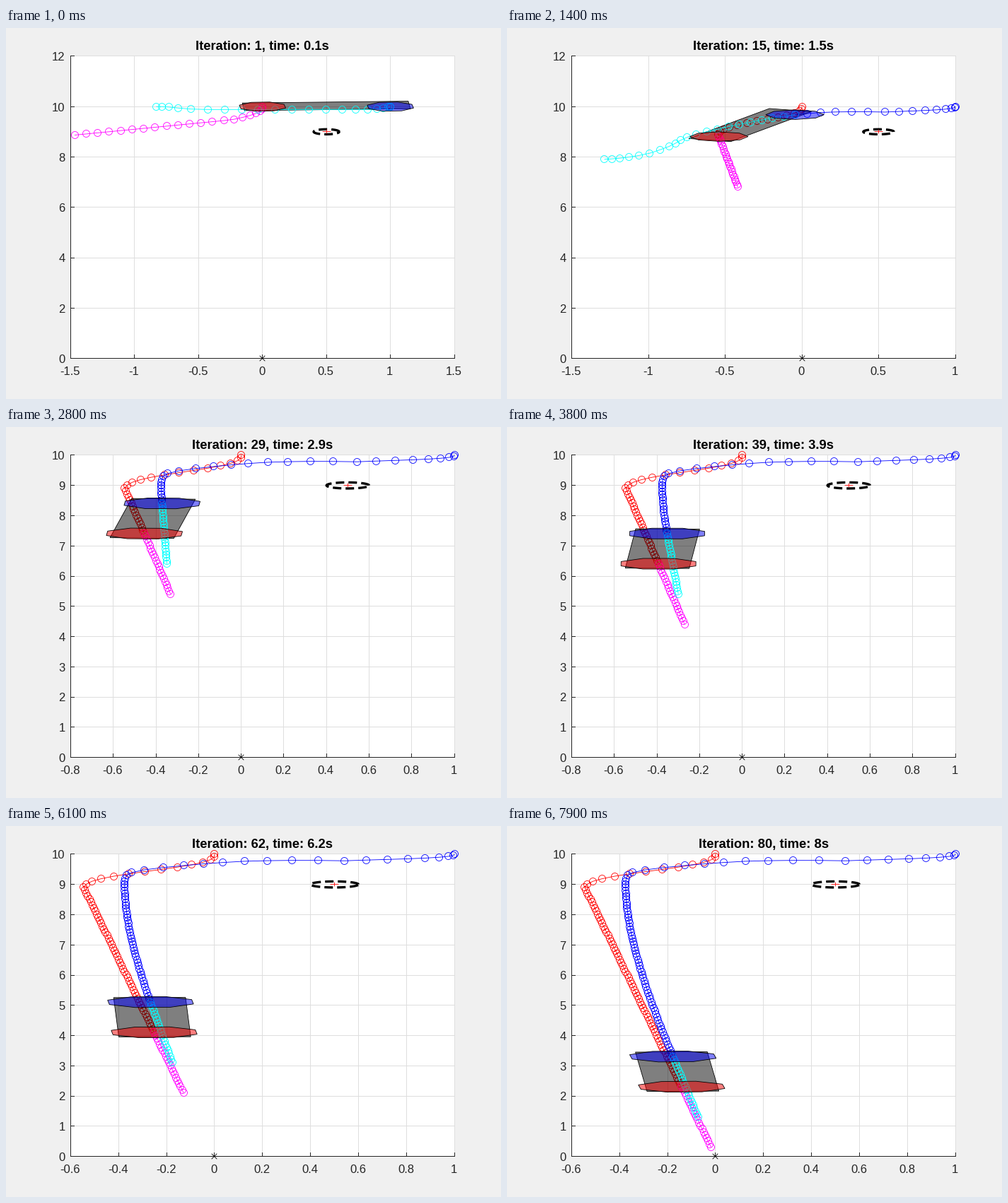
A matplotlib script that plays this animation: 700x525 px, repeating every 8 s.

```python
import numpy as np
import matplotlib.pyplot as plt
from matplotlib.animation import FuncAnimation

W, H = 700, 525
LEFT, RIGHT, TOP, BOTTOM = 91.5, 634.0, 39.9, 467.75
PX = 0.72                      # points per pixel at 100 dpi
THIN = 0.83
STEPS, HORIZON = 80, 20
TURN, SETTLED = 14, 17         # steps where the swing ends and towing begins
INK, GRID = "#262626", "#dedede"

plt.rcParams["font.family"] = "Liberation Sans"

n = np.arange(STEPS + HORIZON + 1)
j = np.arange(HORIZON + 1)


def ease(t):
    return (1 - np.cos(np.pi * np.clip(t, 0, 1))) / 2


def polar(a):
    return np.column_stack([np.cos(a), np.sin(a)])


def mix(a, b, t):
    return a + (b - a) * np.clip(t, 0, 1)


def travel(speed, brake_at, brake):
    """Distance covered along the horizon, slowing down after brake_at."""
    v = speed * brake ** np.maximum(j - brake_at, 0.0)
    return np.cumsum(v) - v[0]


# Lead robot: swings left, then heads straight for the origin.
cruise_y = 10.21 - 0.1 * n
swing_x = -0.54 * ease((n - 0.6) / 12.2)
swing_y = 10 - 0.083 * n - 0.02 * np.sin(2 * np.pi * n / 13)
lead = np.where((n < TURN - 1)[:, None],
                np.column_stack([swing_x, swing_y]),
                np.column_stack([-0.0613 * cruise_y, cruise_y]))

# The load turns faster and faster, then blends into a trailing pose.
turning = 0.056 * n + 0.045 * np.maximum(n - 8, 0)
lag = -0.0612 + 0.19 * np.exp(-0.0345 * (n - 20.0))
trailing = np.arccos(np.clip(lag, -1, 1))
angle = -0.06 * np.logaddexp(-turning / 0.06, -trailing / 0.06)
rear = lead + polar(angle)

# First plan of the lead: keep going left at full speed.
plan = lead.copy()
plan[7:] = [-0.302, 9.445] - np.outer(n[7:] - 7, [0.0897, 0.0442])

# Plans of the rear robot, relative to it, at the start and in the turn.
rear_start = np.column_stack([
    -travel(np.clip(0.018 * (j - 1), 0, 0.132), 16, 0.75),
    0.115 * (ease((j - 15) / 4) - ease((j - 1) / 4))])
rear_turn = -np.column_stack([
    travel(0.072 - 0.038 * np.exp(-((j - 12) / 2) ** 2), 16, 0.9),
    travel(0.062 + 0.005 * j, 15, 0.65)])


def lead_plan(k):
    ahead = slice(k, k + HORIZON + 1)
    return mix(plan[ahead], lead[ahead], (k / TURN) ** 2)


def rear_plan(k):
    swing = rear[k] + mix(rear_start, rear_turn, k / TURN)
    dx = np.cos(angle[k])
    dx = dx - 0.0345 * (dx + 0.0612) * j
    tow = lead[k:k + HORIZON + 1] + polar(np.arccos(np.clip(dx, -1, 1)))
    return mix(swing, tow, (k - TURN) / (SETTLED - TURN))


def limits(k):
    """Left, right and top end of the axes."""
    if k < 16:
        return -2 if 0 < k < 10 else -1.5, 1.5 if k < 6 else 1, 12
    return -0.8 if k < 41 else -0.6, 1, 10


def ring(center, radius, phase, count):
    return center + radius * polar(phase + np.linspace(0, 2 * np.pi, count + 1))


def load(k):
    u, v = polar(angle[k + 1] + np.array([0, np.pi / 2]))
    box = [(-.15, -.15), (1.15, -.15), (1.15, .15), (-.15, .15)]
    return np.array([lead[k] + p * u + q * v for p, q in box])


fig = plt.figure(figsize=(W / 100, H / 100), dpi=100, facecolor="#f0f0f0")
ax = fig.add_axes([0, 0, 1, 1])


def crisp(v):
    return np.floor(v) + 0.5


def line(x, y, color, width=THIN, **kw):
    ax.plot(x, y, color=color, lw=width * PX, snap=False, **kw)


def rule(x, y, color):
    line(crisp(np.array(x)), crisp(np.array(y)), color, 1, solid_capstyle="projecting")


def text(x, y, s, size=16.67, **kw):
    ax.text(x, y, s, fontsize=size * PX, va="baseline", **kw)


def draw_axes(lo, hi, top, sx, sy):
    ax.fill([LEFT, RIGHT, RIGHT, LEFT], [TOP, TOP, BOTTOM, BOTTOM], color="white", lw=0)
    step = 0.5 if hi - lo > 2 else 0.2
    xs = lo + step * np.arange(round((hi - lo) / step) + 1)
    ys = np.arange(0, top + 1, 2 if top == 12 else 1)
    for x in xs:
        rule([sx(x)] * 2, [TOP, BOTTOM], GRID)
    for y in ys:
        rule([LEFT, RIGHT], [sy(y)] * 2, GRID)
    for x in xs:
        rule([sx(x)] * 2, [BOTTOM, BOTTOM - 5], INK)
        text(sx(x) - 0.8, 491.2, f"{round(x, 1) + 0:g}", color=INK, ha="center")
    for y in ys:
        rule([LEFT, LEFT + 5], [sy(y)] * 2, INK)
        text(83.7, sy(y) + 6.3, f"{y:g}", color=INK, ha="right")
    rule([LEFT, LEFT, RIGHT], [TOP, BOTTOM, BOTTOM], INK)


def draw(k):
    ax.clear()
    ax.set(xlim=(0, W), ylim=(H, 0))
    ax.axis("off")
    lo, hi, top = limits(k)

    def sx(x):
        return LEFT + (RIGHT - LEFT) * (x - lo) / (hi - lo)

    def sy(y):
        return BOTTOM - (BOTTOM - TOP) * y / top

    def pixels(p):
        return np.column_stack([sx(p[:, 0]), sy(p[:, 1])])

    def track(p, color, z):
        p = pixels(p)
        line(*p.T, color, zorder=z)
        gap = [[np.nan, np.nan]]
        rings = [np.vstack([ring(c, 5, 0, 24), gap]) for c in crisp(p)]
        line(*np.vstack(rings).T, color, zorder=z)

    def patch(p, rgb, z):
        ax.fill(*pixels(p).T, fc=(*rgb, 0.5), ec="black", lw=THIN * PX, zorder=z)

    draw_axes(lo, hi, top, sx, sy)

    track(lead[:k + 1], "red", 3)
    track(rear[:k + 1], "blue", 3)
    patch(load(k), (0, 0, 0), 4)
    track(lead_plan(k), "magenta", 5)
    track(rear_plan(k), "cyan", 5)
    phase = np.radians(24.5) + angle[k + 1]
    patch(ring(lead[k], 0.19, phase, 8), (1, 0, 0), 6)
    patch(ring(rear[k], 0.19, phase, 8), (0, 0, 1), 6)

    # Obstacle and goal
    rim = pixels(ring(np.array([0.5, 9]), 0.1, 0, 100))
    line(*rim.T, "black", 3.33, ls=(0, (3.6, 1.8)), dash_capstyle="butt")
    cx, cy = crisp(sx(0.5)), crisp(sy(9))
    line([cx - 5.5, cx + 5.5], [cy, cy], "red")
    line([cx, cx], [cy - 2.5, cy + 2.5], "red")
    gx, gy = crisp(sx(0)), crisp(sy(0))
    for d in (3.5, -3.5):
        line([gx - 3.5, gx + 3.5], [gy - d, gy + d], "black")

    text((LEFT + RIGHT) / 2, 31, f"Iteration: {k + 1}, time: {(k + 1) / 10:g}s",
         18.33, color="black", weight="bold", ha="center")
    return []


anim = FuncAnimation(fig, draw, frames=STEPS, init_func=lambda: [],
                     interval=100, repeat=True, repeat_delay=0)
plt.show()
```
